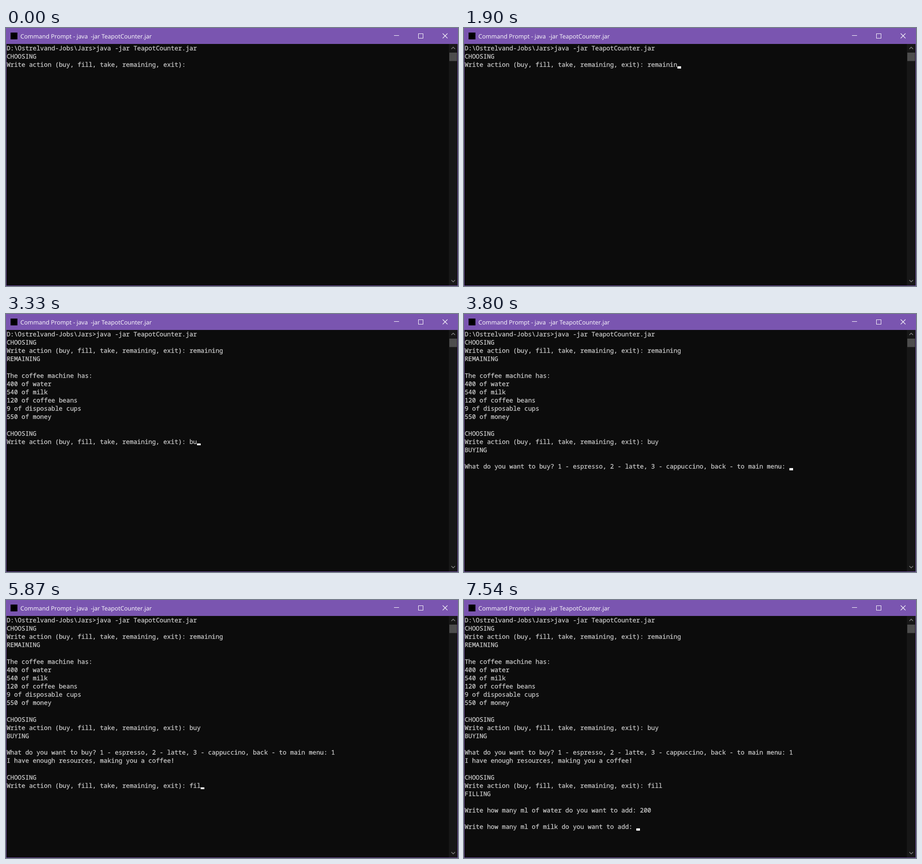
These frames come from a looping animation (989 px wide and 566 px high, 8000 ms). An HTML page with a canvas:

```html
<!DOCTYPE html>
<html lang="en">
<head>
<meta charset="utf-8">
<title>Terminal session</title>
<style>
  html, body { margin: 0; width: 100%; height: 100%; overflow: hidden; background: #0c0c0c; }
  canvas { display: block; }
</style>
</head>
<body>
<canvas id="stage" width="989" height="566"></canvas>
<script>
const ctx = document.getElementById('stage').getContext('2d');
const W = 989, H = 566, LOOP = 8000;
const BAR_H = 35;

// Character grid of the console
const CELL_W = 8.163, CELL_H = 18.14, LEFT = 1.4, TOP = 34.35, BASELINE = 14.6, CURSOR_H = 4.53;

const APP = 'TeapotCounter.jar';
const MENU = 'CHOOSING\nWrite action (buy, fill, take, remaining, exit): ';

// Each stage prints its output, then shows the typed input over time.
// A trailing underscore stands for the visible cursor.
const stages = [
  {
    out: `D:\\Ostrelvand-Jobs\\Jars>java -jar ${APP}\n${MENU}`,
    input: [
      [0, ''], [70, '_'], [430, ''], [690, '_'], [950, ''],
      [1070, 'r_'], [1200, 're_'], [1370, 'rem_'], [1470, 'rema_'], [1530, 'rema'],
      [1570, 'remai_'], [1640, 'remai'], [1700, 'remain_'],
      [1800, 'remaini_'], [1900, 'remainin_'], [2000, 'remaining_']
    ]
  },
  {
    out: '\nREMAINING\n\nThe coffee machine has:\n400 of water\n540 of milk\n' +
         '120 of coffee beans\n9 of disposable cups\n550 of money\n\n' + MENU,
    input: [
      [2230, '_'], [2730, ''], [3060, '_'], [3130, 'b_'],
      [3330, 'bu_'], [3400, 'buy'], [3470, 'buy_'], [3670, 'buy']
    ]
  },
  {
    out: '\nBUYING\n\nWhat do you want to buy? 1 - espresso, 2 - latte, ' +
         '3 - cappuccino, back - to main menu: ',
    input: [[3800, '_'], [4130, ''], [4160, '1_']]
  },
  {
    out: '\nI have enough resources, making you a coffee!',
    input: [[4460, '']]
  },
  {
    out: '\n\n' + MENU,
    input: [
      [4490, '_'], [4720, ''], [5050, '_'], [5310, ''], [5570, '_'],
      [5640, 'f_'], [5700, 'fi_'], [5870, 'fil_'], [5940, 'fil'],
      [6110, 'fill_'], [6280, 'fill']
    ]
  },
  {
    out: '\nFILLING\n\nWrite how many ml of water do you want to add: ',
    input: [
      [6480, ''], [6510, '_'], [6870, ''], [7100, '_'],
      [7170, '2_'], [7240, '20_'], [7340, '200_'], [7440, '200']
    ]
  },
  {
    out: '\n\nWrite how many ml of milk do you want to add: ',
    input: [[7540, '_']]
  }
];

function consoleAt(t) {
  let text = '', cursor = false;
  for (const { out, input } of stages) {
    if (input[0][0] > t) break;
    const typed = input.filter(([time]) => time <= t).pop()[1];
    cursor = typed.endsWith('_');
    text += out + typed.replace('_', '');
  }
  return { lines: text.split('\n'), cursor };
}

function rect(x, y, w, h, color) {
  ctx.fillStyle = color;
  ctx.fillRect(x, y, w, h);
}

function line(color, width, ...points) {
  ctx.strokeStyle = color;
  ctx.lineWidth = width;
  ctx.beginPath();
  points.forEach(([x, y]) => ctx.lineTo(x, y));
  ctx.stroke();
}

function drawWindow() {
  rect(0, 0, W, H, '#7a55b0');
  rect(1, BAR_H, W - 2, H - BAR_H - 1, '#0c0c0c');

  rect(10, 10, 15, 15, '#000');
  ctx.font = '13px "Open Sans", "Noto Sans", sans-serif';
  ctx.fillStyle = '#fff';
  ctx.fillText(`Command Prompt - java  -jar ${APP}`, 31.5, 22.5);

  line('#fff', 1, [849, 16.5], [860, 16.5]);
  ctx.strokeRect(902.5, 12.5, 10, 10);
  line('#fff', 1.1, [955.5, 12], [966, 22.5]);
  line('#fff', 1.1, [966, 12], [955.5, 22.5]);
}

function drawScrollbar() {
  rect(969, BAR_H, 19, H - BAR_H - 1, '#171717');
  rect(970, 54, 17, 18.5, '#4d4d4d');
  line('#868686', 1.5, [974.5, 46], [978.5, 42], [982.5, 46]);
  line('#868686', 1.5, [974.5, 553], [978.5, 557], [982.5, 553]);
}

function drawCursor(col, row) {
  const left = Math.round(LEFT + col * CELL_W);
  const right = Math.round(LEFT + (col + 1) * CELL_W);
  const bottom = TOP + (row + 1) * CELL_H;
  const top = Math.round(bottom - CURSOR_H);
  rect(left, top, right - left, Math.round(bottom) - top, '#fff');
}

function drawConsole({ lines, cursor }) {
  ctx.font = '13.605px "Noto Sans Mono", "DejaVu Sans Mono", monospace';
  ctx.fillStyle = ctx.strokeStyle = '#ccc';
  ctx.lineWidth = 0.3;
  lines.forEach((text, row) => {
    const y = Math.round(TOP + row * CELL_H + BASELINE);
    for (const word of text.matchAll(/\S+/g)) {
      const x = LEFT + word.index * CELL_W;
      ctx.fillText(word[0], x, y);
      ctx.strokeText(word[0], x, y); // slightly heavier strokes
    }
  });
  if (cursor) drawCursor(lines[lines.length - 1].length, lines.length - 1);
}

const start = performance.now();

function frame() {
  const t = (performance.now() - start) % LOOP;
  ctx.textRendering = 'geometricPrecision';
  drawWindow();
  drawScrollbar();
  drawConsole(consoleAt(t));
  requestAnimationFrame(frame);
}
frame();
</script>
</body>
</html>
```
